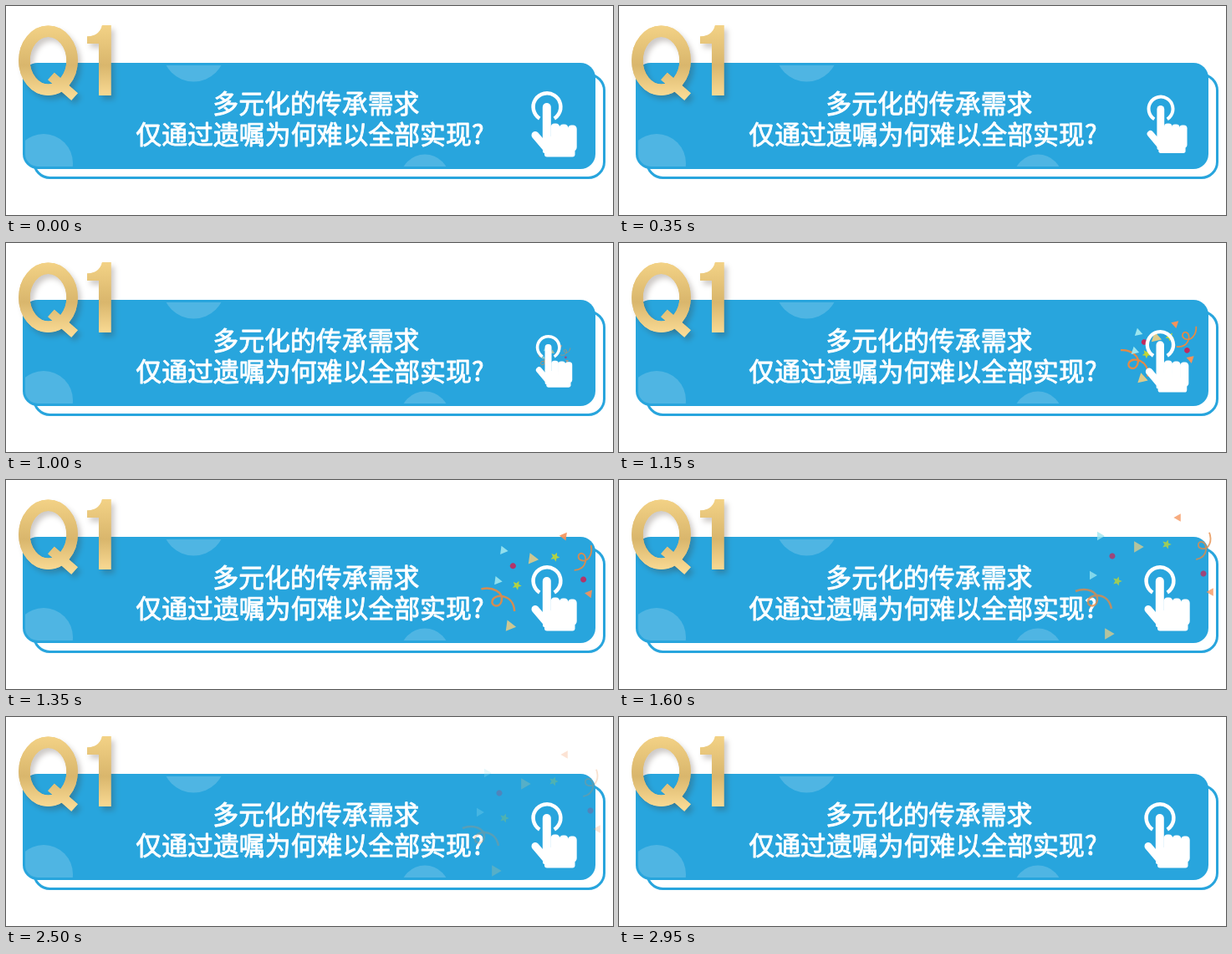
Animation, 726 px wide and 250 px high, one loop 3 s. Source, as an HTML page with a canvas:

```html
<!DOCTYPE html>
<html lang="zh">
<head>
<meta charset="utf-8">
<style>
html, body { margin: 0; width: 726px; height: 250px; overflow: hidden; background: #fff; }
canvas { display: block; }
</style>
</head>
<body>
<canvas id="stage" width="726" height="250"></canvas>
<script>
const ctx = document.getElementById('stage').getContext('2d');
const LOOP = 3000, STEP = 50;
const BLUE = '#28a5dd';

// Confetti flies out from here to the resting places below.
const HUB = { x: 662, y: 143 };
const confetti = [
  { shape: 'curl', color: '#e58a45', size: 1, turn: 0, rest: [[569, 141]] },
  { shape: 'curl', color: '#e58a45', size: 0.75, turn: Math.PI / 2, rest: [[700, 80]] },
  { shape: 'tri', color: '#9be5ef', size: 0.85, turn: 0, rest: [[575, 67], [566, 114]] },
  { shape: 'tri', color: '#dccb8c', size: 1.1, turn: 0, rest: [[620, 80], [585, 184]] },
  { shape: 'tri', color: '#f5935a', size: 0.8, turn: Math.PI, rest: [[669, 45], [708, 134]] },
  { shape: 'dot', color: '#c02a5e', size: 1, turn: 0, rest: [[590, 91], [699, 112]] },
  { shape: 'star', color: '#c0d534', size: 0.9, turn: 0, rest: [[596, 121], [655, 77]] }
];
const shapes = {
  tri: polygon(3, () => 7),
  star: polygon(10, i => i % 2 ? 2.9 : 6.5),
  dot: polygon(24, () => 3.5),
  curl: new Path2D('M-23 -8 C-10 -13 4 -8 3 3 C2 12 -9 11 -8 4 C-7 -5 16 -8 20 13')
};
const one = new Path2D('M125.5 23 V107 H111 V45 H97 V36.5 C107 36 113 32 115 23 Z');

const clamp = v => Math.max(0, Math.min(1, v));
const lerp = (a, b, k) => a + (b - a) * k;

function polygon(n, radius) {
  const p = new Path2D();
  for (let i = 0; i < n; i++) {
    const a = i * 2 * Math.PI / n;
    p.lineTo(radius(i) * Math.cos(a), radius(i) * Math.sin(a));
  }
  p.closePath();
  return p;
}

function box(x, y, w, h, r) {
  ctx.beginPath();
  ctx.roundRect(x, y, w, h, r);
}

function fillBox(...args) {
  box(...args);
  ctx.fill();
}

function disc(x, y, r) {
  ctx.beginPath();
  ctx.arc(x, y, r, 0, Math.PI * 2);
  ctx.fill();
}

function line(x0, y0, x1, y1, width) {
  ctx.lineWidth = width;
  ctx.beginPath();
  ctx.moveTo(x0, y0);
  ctx.lineTo(x1, y1);
  ctx.stroke();
}

function drawCard() {
  ctx.strokeStyle = ctx.fillStyle = BLUE;
  ctx.lineWidth = 3;
  box(33.5, 82, 682, 123.5, 19);
  ctx.stroke();
  fillBox(20, 68, 685, 127, 18);

  ctx.save();
  box(23, 71, 679, 121, 15);
  ctx.clip();
  ctx.fillStyle = 'rgba(255,255,255,0.18)';
  disc(45, 188, 35);
  disc(224.5, 53, 37.5);
  disc(501, 207, 29.5);
  ctx.restore();
}

function drawTitle() {
  ctx.fillStyle = ctx.strokeStyle = '#fff';
  ctx.lineWidth = 0.9;
  ctx.lineJoin = 'round';
  ctx.font = '500 30.9px "Noto Sans CJK SC", "Noto Sans CJK", sans-serif';
  const write = (text, x, y) => {
    ctx.fillText(text, x, y);
    ctx.strokeText(text, x, y);
  };
  write('多元化的传承需求', 247.3, 127.5);
  write('仅通过遗嘱为何难以全部实现?', 155.3, 165);
}

function drawLetters() {
  ctx.lineWidth = 13.5;
  ctx.beginPath();
  ctx.ellipse(50.5, 65.2, 28.6, 35, 0, 0, Math.PI * 2);
  ctx.stroke();
  line(54, 84, 82, 108.5, 11.5);
  ctx.fill(one);
}

function drawBadge() {
  const gold = ctx.createLinearGradient(0, 23, 0, 110);
  gold.addColorStop(0, '#f3d286');
  gold.addColorStop(0.55, '#d9b66c');
  gold.addColorStop(1, '#fbdc96');
  ctx.save();
  ctx.fillStyle = ctx.strokeStyle = gold;
  ctx.shadowColor = 'rgba(60,45,35,0.25)';
  ctx.shadowBlur = 6;
  ctx.shadowOffsetX = 4;
  ctx.shadowOffsetY = 5;
  drawLetters();
  ctx.shadowColor = 'transparent';
  drawLetters();
  ctx.restore();
}

function drawHand(t) {
  const s = t < 900 ? lerp(1, 0.7, t / 900) : lerp(0.7, 1, clamp((t - 900) / 300));
  ctx.save();
  ctx.translate(655.5, 141.5);
  ctx.scale(s, s);
  ctx.translate(-655.5, -141.5);
  ctx.fillStyle = ctx.strokeStyle = '#fff';
  ctx.lineWidth = 4.5;
  ctx.beginPath();
  ctx.arc(647, 120.7, 16.4, Math.PI * 0.68, Math.PI * 2.32);
  ctx.stroke();
  fillBox(641.8, 116, 10, 52, 5);
  for (let i = 0; i < 3; i++) fillBox(651.5 + i * 10.2, 140.5 + i, 10.8, 31, 4.5);
  fillBox(642, 156, 20, 20, 2);
  fillBox(644, 162, 36.5, 18.5, 3);
  ctx.lineCap = 'round';
  line(633, 154.5, 647, 171, 9);
  ctx.restore();
}

function drawBurst(t) {
  if (t <= 900 || t >= 2950) return;
  const spread = 1 - Math.pow(1 - clamp((t - 900) / 700), 1.44);
  const grow = Math.min(1, spread * 2);
  const alpha = clamp((t - 900) / 150) * clamp((2950 - t) / 1750);
  for (const { shape, color, size, turn, rest } of confetti) {
    for (const [x, y] of rest) {
      ctx.save();
      ctx.globalAlpha = alpha;
      ctx.translate(lerp(HUB.x, x, spread), lerp(HUB.y, y, spread));
      ctx.rotate(turn + (1 - spread) * 0.6);
      ctx.scale(size * grow, size * grow);
      ctx.fillStyle = ctx.strokeStyle = color;
      ctx.lineWidth = 2.5;
      if (shape === 'curl') ctx.stroke(shapes.curl);
      else ctx.fill(shapes[shape]);
      ctx.restore();
    }
  }
}

function draw(t) {
  ctx.fillStyle = '#fff';
  ctx.fillRect(0, 0, 726, 250);
  drawCard();
  drawTitle();
  drawBadge();
  drawBurst(t);
  drawHand(t);
}

const start = performance.now();
function tick() {
  const t = (performance.now() - start) % LOOP;
  draw(Math.floor(t / STEP) * STEP);
  requestAnimationFrame(tick);
}
tick();
</script>
</body>
</html>
```
